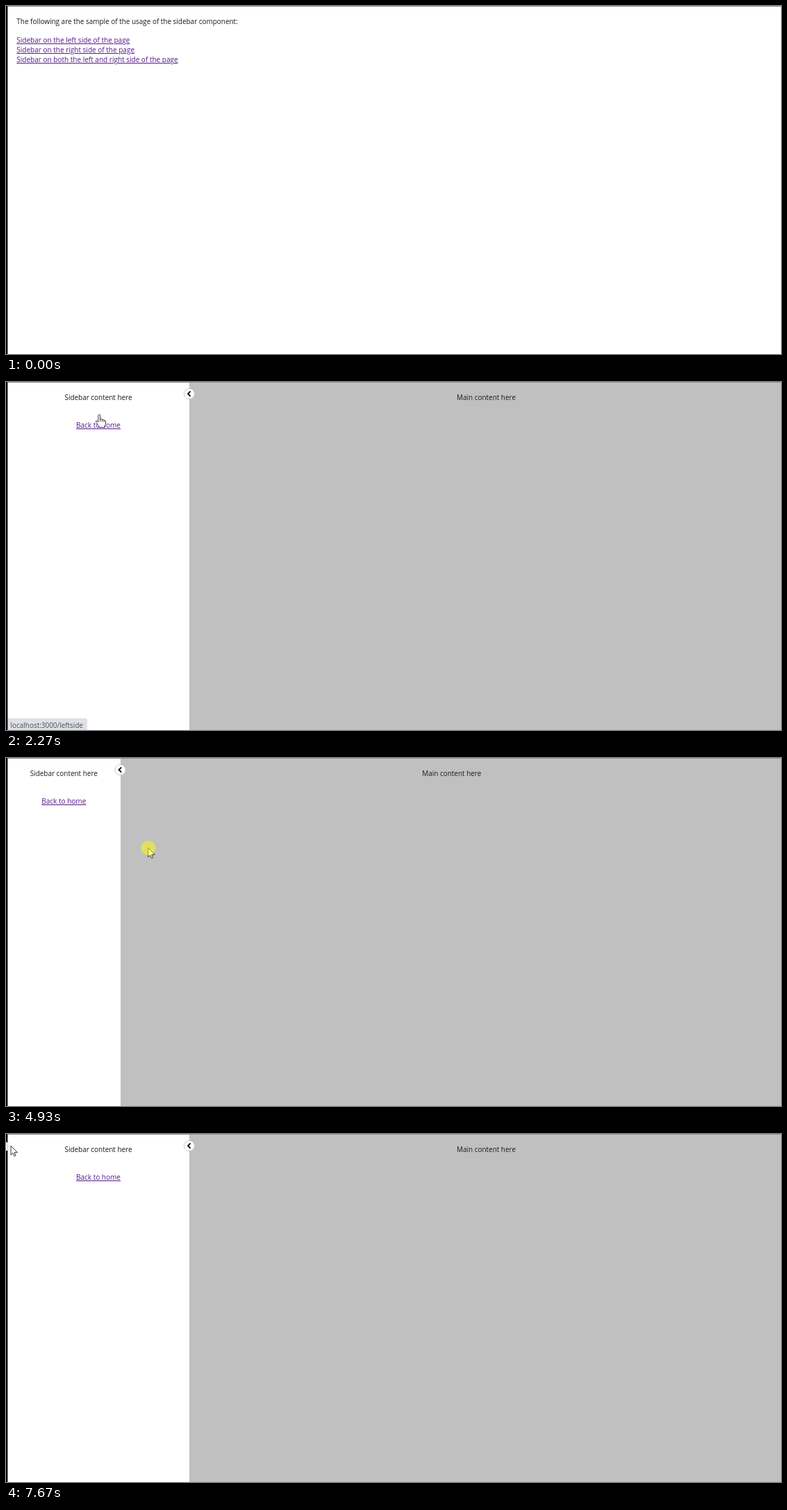
Animation, 1116 px wide and 502 px high, one loop 8000 ms. Source, as an HTML page:

```html
<!DOCTYPE html>
<html lang="en">
<head>
<meta charset="utf-8">
<title>Sidebar component</title>
<style>
  html, body { margin: 0; width: 1116px; height: 502px; overflow: hidden; background: #fff; }
  body { position: relative; font: 9.95px/14px "Open Sans", "Noto Sans", sans-serif; color: #1a1a1a; }
  body > * { position: absolute; }
  p { margin: 0; }
  u { color: #551a8b; font-size: 10.02px; }
  #home { left: 15.3px; top: 15px; white-space: nowrap; }
  #home p { margin-bottom: 13px; }
  #home u { display: table; }
  #main { top: 0; right: 0; bottom: 0; background: #c0c0c0; text-align: center; padding: 15px 0 0 3px; box-sizing: border-box; }
  #side { left: 2px; top: 0; bottom: 0; background: #fff; overflow: hidden; text-align: center; }
  #side div { margin: 15px 13px 0; }
  #side p { margin-bottom: 26px; }
  #status { left: 2px; top: 485px; width: 115px; height: 17px; background: #dee1e6; color: #4a4d51;
    border-top-right-radius: 3px; padding: 3px 0 0 4.5px; box-sizing: border-box; white-space: nowrap; }
  svg { left: 0; top: 0; }
</style>
</head>
<body>
<div id="home">
  <p>The following are the sample of the usage of the sidebar component:</p>
  <u id="link">Sidebar on the left side of the page</u>
  <u>Sidebar on the right side of the page</u>
  <u>Sidebar on both the left and right side of the page</u>
</div>
<div id="main">Main content here</div>
<div id="side"><div><p>Sidebar content here</p><u>Back to home</u></div></div>
<div id="status">localhost:3000/leftside</div>
<svg width="1116" height="502" viewBox="0 0 1116 502" fill="none">
  <path d="M0 0H1116V1H0Z" fill="#8c8c8c"/>
  <path d="M0 0H2.4V502H0Z" fill="#000"/>
  <path id="gap" d="M0 12H2.4V24H0Z" fill="#fff"/>
  <g id="button">
    <circle id="disc" r="7.6" stroke="#b4bcc4" stroke-width=".8"/>
    <path id="chevron" d="M1.6 -3.6L-2 0L1.6 3.6" stroke-width="1.8"/>
  </g>
  <g id="cursor" fill="#fff" stroke="#222" stroke-width=".9" stroke-linejoin="round">
    <path id="arrow" d="M0 0V13.2L3 10.5L5 15L7 14L5 9.7H9.5Z"/>
    <path id="hand" d="M-1.7 11V1.5Q-1.7 0 -.3 0Q1.2 0 1.2 1.5V6.5Q3.8 5.6 4 7.4Q6.3 6.6 6.6 8.3Q9 7.8 9 9.8V13Q9 15 7.5 16.5V18.5H-.5V17Q-2 15.5 -3 13.5L-5 10.5Q-5.5 9 -4.3 8.7Q-3.2 8.5 -1.7 11ZM1.2 6.5V10M4 7.4V10.4M6.6 8.3V10.8"/>
    <path id="resize" d="M-10.2 0L-5 -4.8V-1.7H5V-4.8L10.2 0L5 4.8V1.7H-5V4.8Z"/>
  </g>
  <circle id="halo" r="10.4" fill="#ff0" fill-opacity=".5"/>
</svg>
<script>
const LOOP = 8000, OPEN = 264, NARROW = 68, CLOSED = 2, BUTTON_Y = 17;
const ENTER = 110, NAVIGATE = 2200, LEAVE = 2400;
const DRAG = { start: 3720, end: 5300, lag: 90 };
const COLLAPSE = 6210, EXPAND = 7300, SLIDE = 220;
const $ = id => document.getElementById(id);

// The pointer rests between moves.
const moves = [
  { from: 110, to: 250, x: 469, y: 188 },
  { from: 520, to: 660, x: 139, y: 37 },
  { from: 1060, to: 1280, x: 134.5, y: 47 },
  { from: LEAVE, to: 2900, x: 284, y: 113 },
  { from: 3150, to: 3400, x: 264, y: 120 },
  { from: DRAG.start, to: 4340, x: 67, y: 121 },
  { from: 4630, to: 5150, x: 305, y: 136 },
  { from: 5200, to: 5380, x: 282, y: 68 },
  { from: 5440, to: 5980, x: 267.5, y: 19 },
  { from: 6450, to: 6900, x: 7, y: 17 }
];

const clamp = (v, lo, hi) => Math.min(hi, Math.max(lo, v));
const ramp = (t, from, to) => clamp((t - from) / (to - from), 0, 1);
const smooth = k => k * k * (3 - 2 * k);
const within = (t, from, to) => t >= from && t < to;
const show = (id, on) => { $(id).style.display = on ? '' : 'none'; };
const place = (id, x, y) => $(id).setAttribute('transform', `translate(${x} ${y})`);

function pointer(t) {
  let x = 1020, y = 484;
  for (const m of moves) {
    const k = ramp(t, m.from, m.to);
    x += (m.x - x) * k;
    y += (m.y - y) * k;
  }
  return { x, y };
}

function sidebarEdge(t) {
  if (within(t, DRAG.start, DRAG.end)) return clamp(pointer(t - DRAG.lag).x + 1, NARROW, OPEN);
  const closed = smooth(ramp(t, COLLAPSE, COLLAPSE + SLIDE)) - smooth(ramp(t, EXPAND, EXPAND + SLIDE));
  return OPEN + (CLOSED - OPEN) * closed;
}

function draw(t) {
  const onHome = t < NAVIGATE, edge = sidebarEdge(t), { x, y } = pointer(t);
  const clicking = within(t, 1850, 2010);
  const pressing = within(t, 6050, COLLAPSE - 20) || within(t, 7170, EXPAND);
  show('home', onHome);
  ['main', 'side', 'button'].forEach(id => show(id, !onHome));
  $('link').style.color = clicking ? '#f00' : '';
  $('main').style.left = edge + 'px';
  $('side').style.width = edge - 2 + 'px';
  $('status').style.opacity = ramp(t, 1330, 1610) - ramp(t, 2500, 2700);

  // The shape is refreshed only when the pointer moves off the link.
  const overLink = t <= LEAVE && x < 180 && within(y, 43, 58);
  const overButton = t > LEAVE && Math.hypot(x - edge, y - BUTTON_Y) < 9;
  const overEdge = t > LEAVE && Math.abs(x - edge) < 7;
  const shape = overLink || overButton ? 'hand' : overEdge ? 'resize' : 'arrow';
  ['arrow', 'hand', 'resize'].forEach(id => show(id, id === shape && t >= ENTER));
  place('cursor', x, y);
  place('halo', x, y);
  show('halo', clicking || pressing || within(t, 3670, 5180));

  place('button', edge, BUTTON_Y);
  $('disc').setAttribute('fill', overButton ? '#696969' : '#fff');
  $('chevron').setAttribute('stroke', overButton ? '#fff' : '#000');
  $('chevron').setAttribute('transform', within(t, COLLAPSE, EXPAND) ? 'scale(-1 1)' : '');
  show('gap', t >= COLLAPSE + SLIDE);
}

const start = performance.now();
function tick() {
  draw((performance.now() - start) % LOOP);
  requestAnimationFrame(tick);
}
tick();
</script>
</body>
</html>
```
